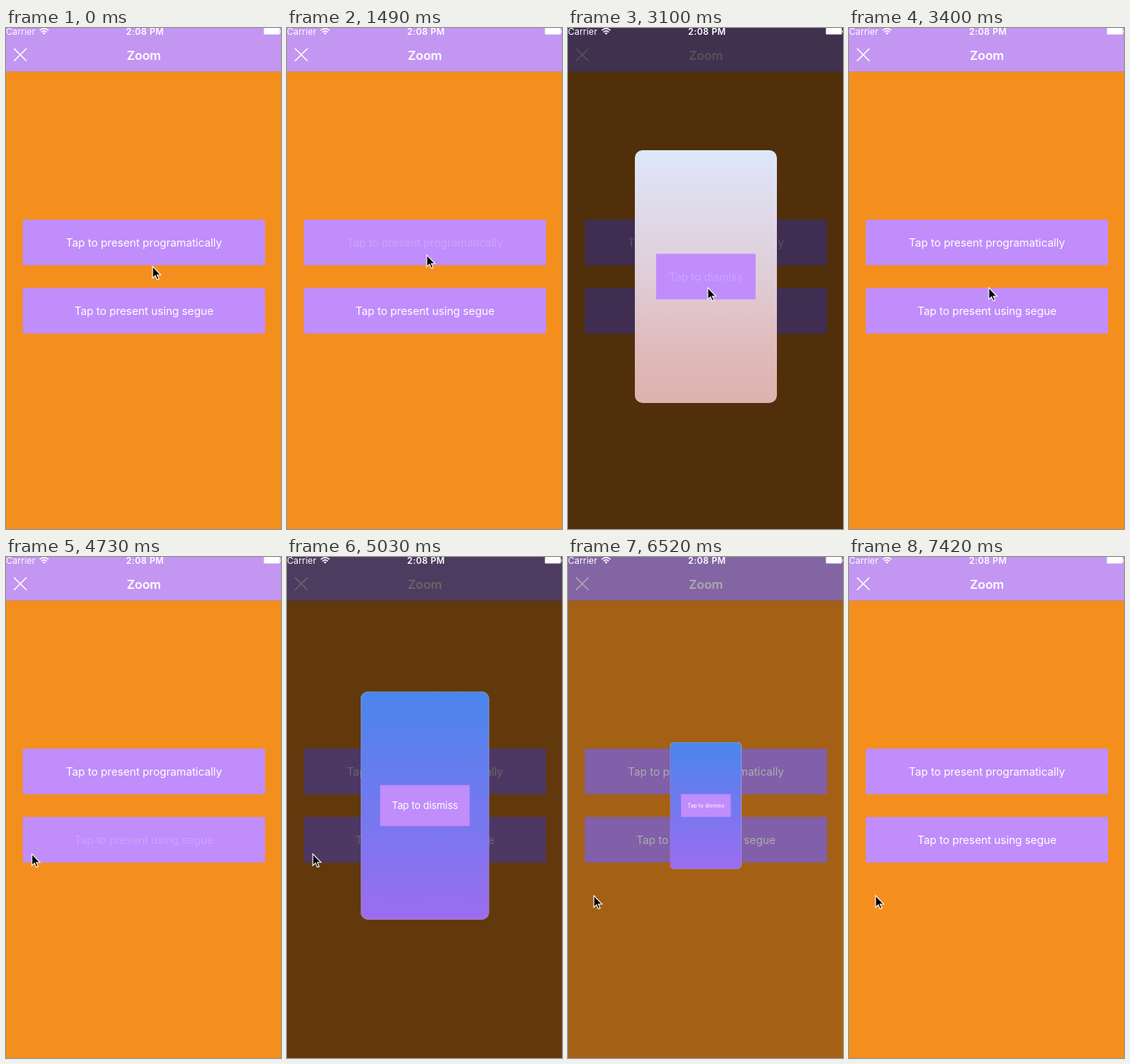
Recreate the animation shown at these times as an HTML page. Size 362 px wide and 660 px high, loop 8.26 s.

```html
<!DOCTYPE html>
<html lang="en">
<head>
<meta charset="utf-8">
<title>Zoom</title>
<style>
  html, body { margin: 0; width: 100%; height: 100%; overflow: hidden; background: #f48f1e; }
  svg { display: block; width: 362px; height: 660px; }
  text { font: 14.5px Inter, Roboto, sans-serif; letter-spacing: -.12px; fill: #fff; }
  .middle { text-anchor: middle; }
  .title { font-size: 16.4px; font-weight: 600; }
  .status { font-size: 11.6px; letter-spacing: .1px; }
  .clock { font-weight: 600; letter-spacing: .4px; }
  .button { fill: #c08dfb; }

  .dim, .card, .cool, .press-first, .press-second, .press-dismiss, .cursor {
    animation: 8260ms step-end infinite;
  }
  .dim { animation-name: dim; }
  .card { animation-name: zoom; transform-origin: 181.5px 327.5px; }
  .cool { animation-name: recolor; }
  .press-first { animation-name: press-first; }
  .press-second { animation-name: press-second; }
  .press-dismiss { animation-name: press-dismiss; }
  .cursor { animation-name: point; }

  @keyframes dim {
    0%, 41.16%, 80.75%, 100% { opacity: 0; }
    19.85%, 59.07% { opacity: .25; }
    21.54%, 60.89% { opacity: .6; }
    23.36%, 62.71% { opacity: .67; }
    39.34%, 78.93% { opacity: .33; }
  }
  @keyframes zoom {
    0%, 41.16%, 80.75%, 100% { transform: scale(0); }
    19.85%, 59.07% { transform: scale(.37); }
    21.54%, 60.89% { transform: scale(.9); }
    23.36%, 62.71% { transform: scale(1); }
    39.34%, 78.93% { transform: scale(.5); }
  }
  @keyframes recolor {
    0%, 100% { opacity: 0; }
    46.48% { opacity: 1; }
  }
  @keyframes press-first {
    0%, 21.54%, 100% { opacity: 1; }
    18.03% { opacity: .2; }
  }
  @keyframes press-second {
    0%, 60.89%, 100% { opacity: 1; }
    57.26% { opacity: .2; }
  }
  @keyframes press-dismiss {
    0%, 41.16%, 100% { opacity: 1; }
    37.53% { opacity: .2; }
  }
  @keyframes point {
    0% { transform: translate(193px, 314px); }
    10.89% { transform: translate(193px, 314px); animation-timing-function: steps(2, jump-start); }
    14.4% { transform: translate(184px, 299px); }
    28.69% { transform: translate(184px, 299px); animation-timing-function: steps(5, jump-start); }
    37.53% { transform: translate(184px, 342px); }
    46.48% { transform: translate(184px, 342px); animation-timing-function: steps(6, jump-start); }
    57.26% { transform: translate(34px, 391px); }
    62.71% { transform: translate(34px, 391px); animation-timing-function: steps(6, jump-start); }
    73.48% { transform: translate(34px, 446px); }
    89.83%, 100% { transform: translate(35px, 446px); }
  }
</style>
</head>
<body>
<svg viewBox="0 0 362 660">
  <defs>
    <linearGradient id="warm" x2="0" y2="1">
      <stop stop-color="#dce9fc"/>
      <stop offset=".08" stop-color="#dfe2f4"/>
      <stop offset=".5" stop-color="#dfcdd7"/>
      <stop offset=".82" stop-color="#dfb8b8"/>
      <stop offset="1" stop-color="#deb2ae"/>
    </linearGradient>
    <linearGradient id="cool" x2="0" y2="1">
      <stop stop-color="#4a86ec"/>
      <stop offset=".5" stop-color="#7379ef"/>
      <stop offset="1" stop-color="#9c6df0"/>
    </linearGradient>
  </defs>

  <rect width="362" height="660" fill="#f48f1e"/>
  <rect width="362" height="57.5" fill="#c396f2"/>
  <path d="M0 57.8H362" stroke="#c4843c" stroke-width=".7"/>
  <path d="M10.5 27L27 43.5M27 27L10.5 43.5" stroke="#fff" stroke-width="1.6"/>
  <text class="middle title" x="181.5" y="42">Zoom</text>

  <rect class="button" x="22" y="252.5" width="319" height="60"/>
  <text class="middle press-first" x="181.5" y="288">Tap to present programatically</text>
  <rect class="button" x="22" y="342.5" width="319" height="60"/>
  <text class="middle press-second" x="181.5" y="378">Tap to present using segue</text>

  <rect class="dim" width="362" height="660"/>

  <g class="card">
    <rect x="88" y="161" width="187" height="333" rx="10" fill="url(#warm)"/>
    <rect class="cool" x="88" y="161" width="187" height="333" rx="10" fill="url(#cool)"/>
    <rect class="button" x="116" y="297.5" width="131" height="60"/>
    <text class="middle press-dismiss" x="181.5" y="333">Tap to dismiss</text>
  </g>

  <text class="status" x="0" y="9">Carrier</text>
  <g fill="none" stroke="#fff" stroke-width="1.6">
    <path d="M44.5 3.2Q50.2 -1.8 55.9 3.2M46.6 5.5Q50.2 2.3 53.8 5.5"/>
    <path d="M48.2 6.8Q50.2 5.2 52.2 6.8L50.2 8.8Z" fill="#fff" stroke="none"/>
  </g>
  <text class="middle status clock" x="183" y="9">2:08 PM</text>
  <rect x="339.5" y="0" width="21" height="8.5" rx="1" fill="#fff"/>
  <path d="M361.3 3v3" stroke="#fff" stroke-width=".8"/>

  <path class="cursor" d="M0 0V15.5L3.6 12.2L6 17.6L8.3 16.6L6 11.3H10.8Z" stroke="#fff" stroke-width="1.1"/>
</svg>
</body>
</html>
```
